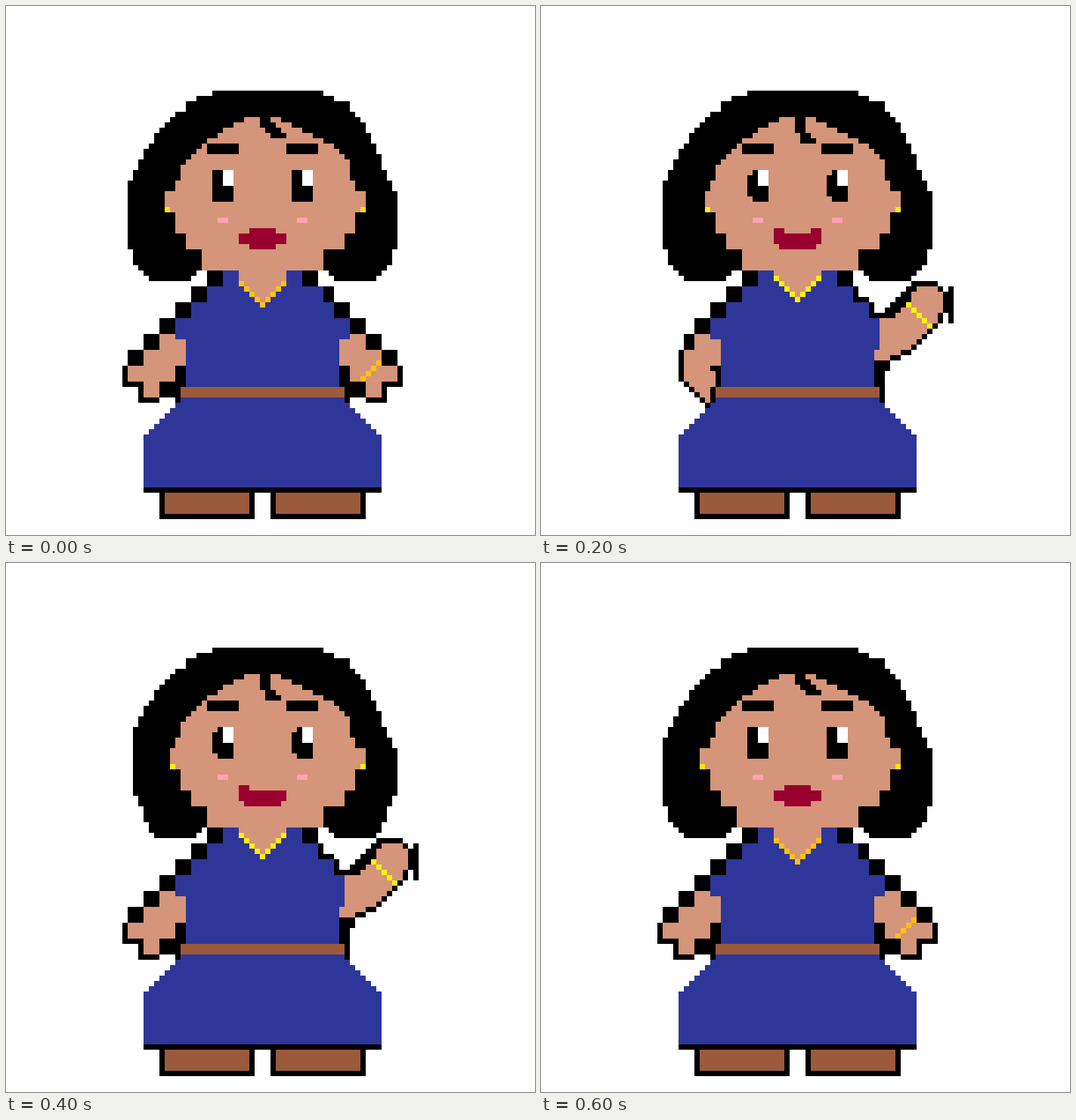
Recreate the animation shown at these times as an HTML page with a canvas. Size 700x700 px, loop 0.7 s.

```html
<!DOCTYPE html>
<html lang="en">
<head>
<meta charset="utf-8">
<title>Waving pixel woman</title>
<style>
  html, body { margin: 0; width: 100%; height: 100%; overflow: hidden; background: #fff; }
  canvas { display: block; width: 700px; height: 700px; }
</style>
</head>
<body>
<canvas id="stage" width="700" height="700"></canvas>
<script>
const ctx = document.getElementById('stage').getContext('2d');
const CELL = 7, AXIS = 97;
const INK = '#000', SKIN = '#d4957a', BLUE = '#2f3699', BROWN = '#9c5a3c', WHITE = '#fff';
const LIPS = '#990030', BLUSH = '#ffa3b1', YELLOW = '#fff200', AMBER = '#ffe600', GOLD = '#ffc20e';

function box(color, x, y, w, h) {
  ctx.fillStyle = color;
  ctx.fillRect(x * CELL, y * CELL, w * CELL, h * CELL);
}

const snap = x => Math.ceil(x - 0.5 - 1e-6);
const flip = (points, axis = AXIS) => points.map(([x, y]) => [axis - x, y]).reverse();

// rows of whole cells inside a polygon, as [x, y, width]
function spans(points) {
  const ys = points.map(p => p[1]), out = [];
  for (let y = Math.floor(Math.min(...ys)); y < Math.max(...ys); y++) {
    const c = y + 0.5, xs = [];
    points.forEach(([x1, y1], i) => {
      const [x2, y2] = points[(i + 1) % points.length];
      if ((y1 <= c) !== (y2 <= c)) xs.push(x1 + (c - y1) * (x2 - x1) / (y2 - y1));
    });
    xs.sort((a, b) => a - b);
    for (let i = 0; i + 1 < xs.length; i += 2) {
      const x = snap(xs[i]);
      out.push([x, y, snap(xs[i + 1]) - x]);
    }
  }
  return out;
}

function shape(color, points) {
  for (const [x, y, w] of spans(points)) box(color, x, y, w, 1);
}

// skin shape with a one-cell ink outline
function limb(points) {
  const rows = spans(points);
  for (const [x, y, w] of rows) {
    box(INK, x - 1, y, w + 2, 1);
    box(INK, x, y - 1, w, 3);
  }
  for (const [x, y, w] of rows) box(SKIN, x, y, w, 1);
}

function diagonal(color, x, y, dx, n, size = 1) {
  for (let i = 0; i < n; i++) box(color, x + dx * i, y + size * i, size, size);
}

function hair(slim) {
  const s = slim ? 1 : 0;
  const bob = [
    ...(slim ? [[24, 44], [24.6, 44], [27.8, 52]] : [[23, 46], [23.8, 46], [24.3, 49], [27.5, 52]]),
    [34.5 + s, 52], [36.5 + s, 50]
  ];
  const left = [[40.25, 16], [34, 18.5], [34.1, 19], [27.95, 24.75], [23.5, 33], [23 + s, 33]];
  const right = [[73.6, 35.6], [68.5, 23.5], [64.9, 19], [65, 18.5], [58.75, 16]];
  shape(INK, [...left, ...bob, ...flip(bob, AXIS + s), ...right]);
}

// outline of the cheek: each step is [x, bottom]
function cheek(shift) {
  const steps = [[33, 33], [32, 35], [30, 39], [32, 43], [34, 46], [37.5, 50]];
  let top = 30.5;
  return steps.flatMap(([x, bottom], i) => {
    const edge = x + (i > 1 ? shift : 0), pair = [[edge, top], [edge, bottom]];
    top = bottom;
    return pair;
  });
}

function face(p) {
  const turn = p.turned ? 1 : 0;
  shape(SKIN, [[45.8, 21], [37.9, 25.5], ...cheek(turn), ...flip(cheek(0), 98), [65, 29.5], [62, 26.5], [51, 21]]);
  if (p.idle) {
    box(INK, 48, 21, 2, 1);
    for (let i = 0; i < 3; i++) box(INK, 48 + i, 22 + i, 3, 1);
  } else {
    box(INK, 48, 21, 2, 3);
    box(INK, 49, 24, 2, 2);
    box(INK, 51, 25, 1, 1);
  }
  box(p.stud, 30 + turn, 38, 1, 1);
  box(p.stud, 67, 38, 1, 1);
  for (const x of [38, 53]) box(INK, x, 26, 6, 2);
  for (const x of [39, 54]) {
    box(INK, x, 31 + turn, 4, 6 - 2 * turn);
    box(INK, x + 1, 31, 3, 6);
    box(WHITE, x + 2, 31, 2, 3);
    box(BLUSH, x + 1, 40, 2, 1);
  }
  mouth(p);
}

function mouth(p) {
  box(LIPS, 44, 43, 9, 2);
  if (p.idle) return box(LIPS, 46, 42, 5, 4);
  box(LIPS, 45, 45, 7, 1);
  if (p.turned) box(LIPS, 44, 42, 2, 1);
  if (p.turned && !p.slim) box(LIPS, 51, 42, 2, 1);
}

function body(p) {
  for (let i = 0; i < 3; i++) box(BLUE, 41 - 3 * i, 50 + 3 * i, 15 + 6 * i, 3);
  box(BLUE, 32, 59, 32, 4);
  box(BLUE, 34, 63, 29, 9);
  const hem = [[33.5, 74], [26, 81.5], [26, 91]];
  shape(BLUE, [...hem, ...flip(hem)]);
  box(BROWN, 33, 72, 31, 2);
  box(INK, 26, 91, 45, 1);
  for (const x of [29, 50]) {
    box(INK, x, 91, 18, 6);
    box(BROWN, x + 1, 92, 16, 4);
  }
  const y = p.turned ? 51 : 52;
  shape(SKIN, [[44, 50], [44, y], [48.5, y + 4.5], [53, y], [53, 50]]);
  diagonal(p.chain, 44, y, 1, 5);
  diagonal(p.chain, 52, y, -1, 5);
}

// left arm held away from the hip
function armOut() {
  diagonal(INK, 38, 50, -3, 6, 3);
  limb([[29, 62], [34, 62], [34, 68], [32, 68], [32, 71], [29, 71], [29, 74],
    [26, 74], [26, 71], [23, 71], [23, 68], [26, 68], [26, 65], [29, 65]]);
  box(INK, 22, 71, 1, 1);
  box(INK, 25, 74, 1, 1);
  box(INK, 32, 68, 2, 4);
  box(INK, 29, 71, 4, 3);
  box(INK, 32, 74, 1, 1);
}

// left hand on the hip
function armHip() {
  diagonal(INK, 38, 50, -3, 4, 3);
  box(INK, 27, 62, 2, 3);
  limb([[29, 62], [34, 62], [34, 68], [33, 68], [33, 72], [32, 72], [32, 75], [31.5, 75],
    [27, 70.5], [27, 65], [29, 65]]);
  box(INK, 32, 68, 2, 1);
}

function armDown() {
  ctx.save();
  ctx.translate(AXIS * CELL, 0);
  ctx.scale(-1, 1);
  armOut();
  ctx.restore();
  box(BLUE, 59, 53, 1, 3);
  box(BLUE, 64, 59, 1, 4);
  diagonal(GOLD, 70, 67, -1, 4);
}

// seam from neck to waist on the side of the moving arm
function seam() {
  box(INK, 56, 50, 3, 3);
  box(INK, 59, 53, 1, 3);
  box(INK, 60, 55, 2, 1);
  box(INK, 62, 56, 1, 3);
  box(INK, 63, 58, 2, 1);
  box(INK, 63, 68, 2, 4);
  box(INK, 64, 72, 1, 3);
  box(BLUE, 63, 59, 1, 6);
}

function armLevel() {
  limb([[64, 61], [65.7, 61], [67, 62.5], [67, 64], [74, 64], [74, 63.3], [75, 62],
    [77, 62], [78, 63.3], [78, 64], [80, 64], [80, 69], [63, 69], [63, 65], [64, 65]]);
  seam();
  box(INK, 65, 59, 1, 2);
  box(BLUE, 64, 59, 1, 2);
  box(YELLOW, 73, 64, 1, 5);
}

function armUp() {
  for (let i = 0; i < 6; i++) box(INK, 65 + i, 57 - i, 3, 1);
  box(INK, 65, 58, 2, 1);
  box(INK, 77, 53, 1, 7);
  box(INK, 63, 67, 3, 2);
  limb([[64, 59], [66.5, 59], [70.4, 55], [70.4, 54.2], [71, 53], [75, 53], [76, 54], [76, 58],
    [75.3, 58], [75.5, 59], [70, 64.6], [65.3, 66.6], [64.3, 67], [63, 67], [63, 65], [64, 65]]);
  seam();
  diagonal(YELLOW, 69, 56, 1, 5);
}

const rest = { idle: true, stud: AMBER, chain: GOLD, left: armOut, right: armDown };
const lift = { stud: YELLOW, chain: YELLOW, left: armOut, right: armLevel };
const wave = { turned: true, stud: YELLOW, chain: YELLOW, left: armHip, right: armUp };
const ease = { ...wave, slim: true, left: armOut };
const lower = { ...lift, chain: GOLD };

const LOOP = 700;
const steps = [[0, rest], [100, lift], [200, wave], [400, ease], [500, lower], [600, rest]];

function draw(p) {
  box(WHITE, 0, 0, 100, 100);
  hair(p.slim);
  face(p);
  p.left();
  p.right();
  body(p);
}

let shown = null, start = null;
function tick(now) {
  if (start === null) start = now;
  const t = (now - start) % LOOP;
  const pose = steps.filter(([at]) => at <= t).pop()[1];
  if (pose !== shown) draw(shown = pose);
  requestAnimationFrame(tick);
}
draw(shown = rest);
requestAnimationFrame(tick);
</script>
</body>
</html>
```
